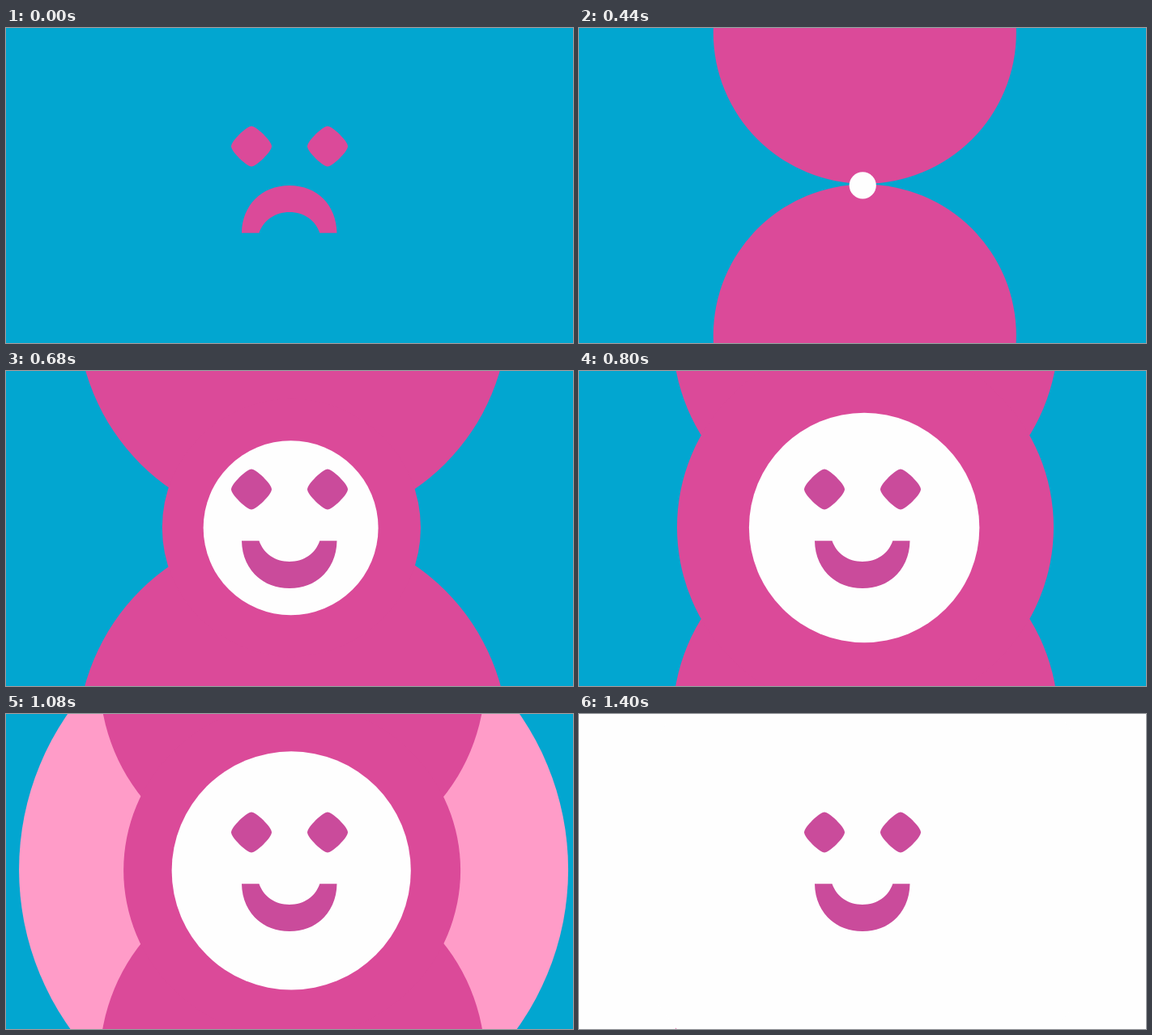
An HTML page that plays this animation: 700x390 px, repeating every 2400 ms.

```html
<!DOCTYPE html>
<html lang="en">
<head>
<meta charset="utf-8">
<title>Frown to smile</title>
<style>
  html, body { margin: 0; width: 100%; height: 100%; overflow: hidden; background: #02a6d0; }
  svg { display: block; width: 100%; height: 100%; }
  .pink { fill: #db4a99; }
  .light { fill: #ff9cc8; }
  .white { fill: #fefefe; }
  .smile { fill: #ca4b9b; }
</style>
</head>
<body>
<svg viewBox="0 0 700 390">
  <defs>
    <path id="eye" d="M0-25C6-25 25-6.5 25 0S6 25 0 25S-25 6.5-25 0S-6-25 0-25Z"/>
    <g id="eyes">
      <use href="#eye" x="303" y="146.5"/>
      <use href="#eye" x="397" y="146.5"/>
    </g>
    <path id="mouth" d="M291 210.3C291.5 244 315 269 350 269S408 244 408.5 210.3H387.3C382 226 368 236 350 236S318 226 312.5 210.3Z"/>
    <clipPath id="inside"><circle id="mask"/></clipPath>
  </defs>
  <g class="pink">
    <use href="#eyes"/>
    <use href="#mouth" transform="matrix(1 0 0 -1 0 464)"/>
  </g>
  <circle id="wash" class="white"/>
  <circle id="halo" class="light"/>
  <circle id="upper" class="pink"/>
  <circle id="lower" class="pink"/>
  <circle id="core" class="pink"/>
  <circle id="disc" class="white"/>
  <g class="smile" clip-path="url(#inside)">
    <use href="#eyes"/>
    <use href="#mouth"/>
  </g>
</svg>
<script>
  const LOOP = 2400, STEP = 40;
  const el = id => document.getElementById(id);

  // Eased progress from 0 to 1
  const ease = (t, start, length) => {
    const s = Math.min(1, Math.max(0, (t - start) / length));
    return s * s * (3 - 2 * s);
  };

  // Grow past the final radius, then settle back
  const pop = (t, start, length, size) =>
    size * (1.15 * ease(t, start, length) - 0.15 * ease(t, start + length, 133));

  // The circles scale from a point slightly off their own centre
  function place(id, r, cy = 195 - 0.007 * r) {
    const c = el(id);
    c.setAttribute('cx', 350 + 0.015 * r);
    c.setAttribute('cy', cy);
    c.setAttribute('r', r);
  }

  function draw(t) {
    const side = pop(t, 107, 533, 238);
    const disc = 147.6 * ease(t, 329, 532) + 158.4 * ease(t, 1080, 320);
    place('upper', side, 192.8 - side);
    place('lower', side, 193.6 + side);
    place('core', pop(t, 423, 419, 208));
    place('halo', pop(t, 574, 533, 297));
    place('wash', 500 * ease(t, 787, 533));
    place('disc', disc);
    place('mask', disc);
  }

  const begin = performance.now();
  function tick() {
    const t = (performance.now() - begin) % LOOP;
    draw(Math.floor(t / STEP) * STEP);
    requestAnimationFrame(tick);
  }
  tick();
</script>
</body>
</html>
```
